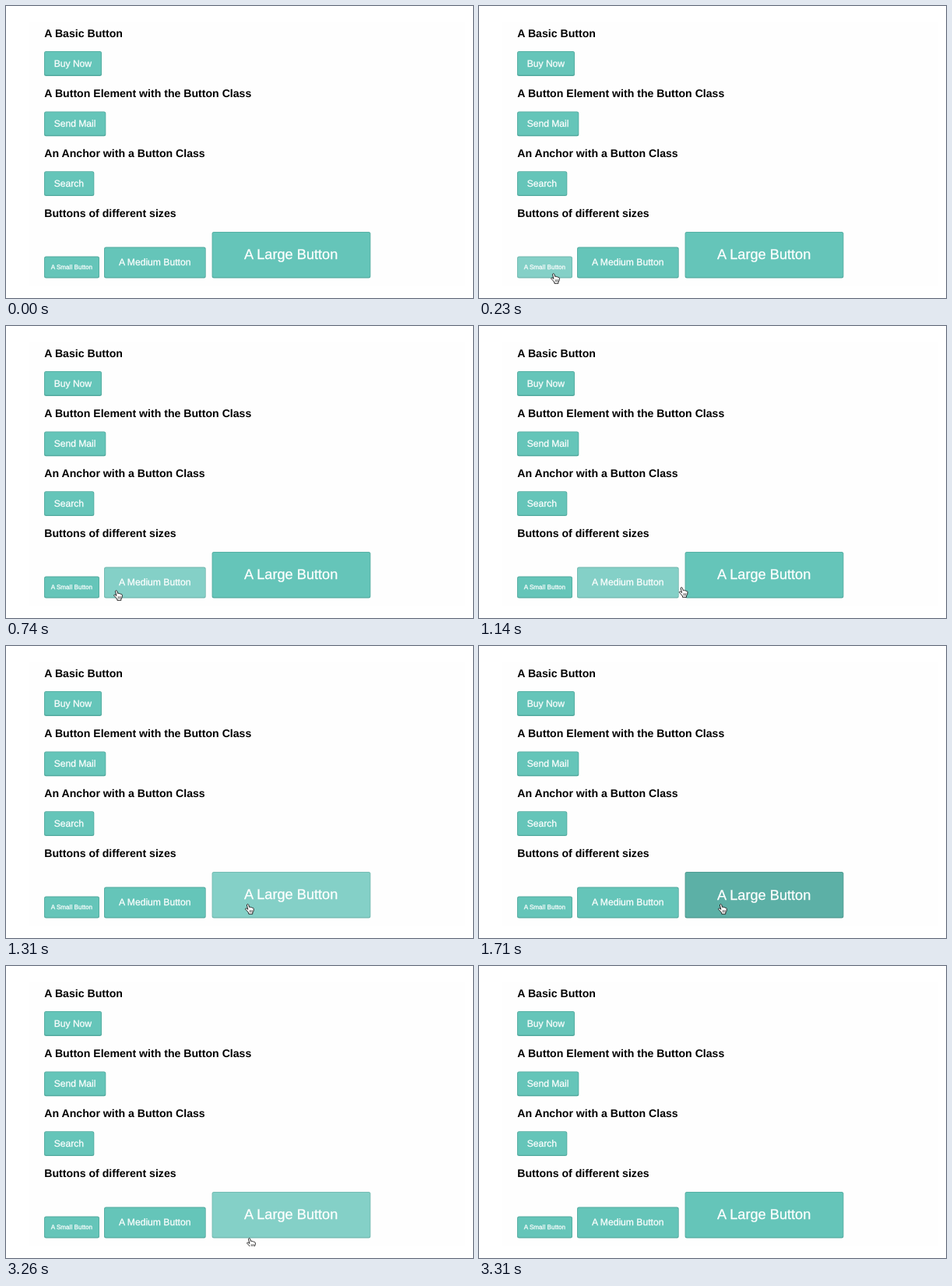
Recreate the animation shown at these times as an HTML page. Size 600x375 px, loop 3.66 s.

```html
<!DOCTYPE html>
<html lang="en">
<head>
<meta charset="utf-8">
<title>Button states</title>
<style>
  html, body { margin: 0; width: 100%; height: 100%; overflow: hidden; background: #fff; }
  svg { display: block; font-family: "Liberation Sans", Arial, sans-serif; text-rendering: geometricPrecision; }
  .heading { font-weight: bold; font-size: 14.12px; }
  .face { fill: #65c5b9; }
  .edge { fill: #53aa9f; }
  .label { fill: #fff; stroke: #fff; stroke-width: .25px; }
  .hover .face { fill: #84d0c7; }
  .hover .edge { fill: #70b7ae; }
  .pressed .face { fill: #5cb0a6; }
  .pressed .edge { fill: #4c978d; }
  .pressed .label { transform: translateY(1px); }
</style>
</head>
<body>
<svg id="stage" width="600" height="375" viewBox="0 0 600 375">
  <clipPath id="panel"><rect x="30" y="20" width="560" height="340"/></clipPath>
  <rect x="30" y="20" width="560" height="340" fill="#fefefe"/>
  <g id="page"></g>
  <g clip-path="url(#panel)">
    <g id="hand" stroke="#111" stroke-width=".9" stroke-linejoin="round" stroke-linecap="round">
      <path fill="#fff" d="M2.5 1.7C2.4.4 4.3.2 4.7 1.4L5.7 4.6C6.4 4 7.5 4.2 7.8 5C8.5 4.5 9.5 4.8 9.8 5.6C10.6 5.2 11.4 5.8 11.4 6.7L11.1 9.6L9.9 11.6V13.3H4.9V12L2.7 9.2L.8 7.3C.4 6.2 1.6 5.6 2.5 6.3L3.7 7.2Z"/>
      <path fill="none" stroke-width=".6" d="M6.2 8.6V11M7.8 8.6V11M9.3 8.6V11"/>
    </g>
  </g>
</svg>
<script>
const LOOP = 3660;
const page = document.getElementById('page');
const hand = document.getElementById('hand');

function add(parent, tag, attrs, text = '') {
  const node = document.createElementNS('http://www.w3.org/2000/svg', tag);
  for (const name in attrs) node.setAttribute(name, attrs[name]);
  node.textContent = text;
  parent.append(node);
  return node;
}

function heading(text, y) {
  add(page, 'text', { class: 'heading', x: 49.3, y }, text);
}

function button(text, x, y, width, height, textX, baseline, size = 12) {
  const group = add(page, 'g', {});
  add(group, 'rect', { class: 'edge', x, y, width, height, rx: 2.5 });
  add(group, 'rect', { class: 'face', x: x + .8, y: y + .8, width: width - 1.6, height: height - 2.2, rx: 1.8 });
  add(group, 'text', { class: 'label', x: textX, y: baseline, 'font-size': size }, text);
  return group;
}

heading('A Basic Button', 39.9);
button('Buy Now', 49, 58, 74, 32, 61.7, 77.6, 12.1);
heading('A Button Element with the Button Class', 117);
button('Send Mail', 49, 135.4, 79.3, 31.8, 61.7, 154.7, 12.1);
heading('An Anchor with a Button Class', 194.2);
button('Search', 49, 212.3, 64.3, 31.8, 61.7, 231.9, 12.1);
heading('Buttons of different sizes', 271.3);
const sized = {
  small: button('A Small Button', 49, 321.6, 71, 28, 57.7, 338.3, 8.15),
  medium: button('A Medium Button', 126, 309.6, 130.7, 40, 145, 332.8, 12.15),
  large: button('A Large Button', 264.6, 290, 203.8, 59.6, 306, 325.3, 18.2)
};

// Start time, pointer x, pointer y, active button, its state
const steps = [
  [0],
  [110, 85, 354],
  [170, 89, 347, 'small', 'hover'],
  [220, 92, 343, 'small', 'hover'],
  [280, 94, 341, 'small', 'hover'],
  [570, 97.6, 338.2, 'small', 'hover'],
  [630, 113, 338, 'small', 'hover'],
  [690, 138, 339, 'medium', 'hover'],
  [750, 164, 340, 'medium', 'hover'],
  [800, 183, 341, 'medium', 'hover'],
  [860, 195, 341.5, 'medium', 'hover'],
  [1030, 210, 340, 'medium', 'hover'],
  [1090, 234, 338, 'medium', 'hover'],
  [1140, 256.6, 335, 'medium', 'hover'],
  [1200, 281, 333, 'large', 'hover'],
  [1260, 300, 332, 'large', 'hover'],
  [1310, 306.9, 330.9, 'large', 'hover'],
  [1710, 306.9, 330.9, 'large', 'pressed'],
  [2170, 306.9, 330.9, 'large', 'hover'],
  [3260, 309, 349, 'large', 'hover'],
  [3310]
];

const start = performance.now();

function draw() {
  const time = (performance.now() - start) % LOOP;
  const [, x, y, active, state] = steps.findLast(step => step[0] <= time);
  hand.style.display = x ? '' : 'none';
  if (x) hand.setAttribute('transform', `translate(${x} ${y})`);
  for (const name in sized) sized[name].setAttribute('class', name === active ? state : '');
  requestAnimationFrame(draw);
}
draw();
</script>
</body>
</html>
```
